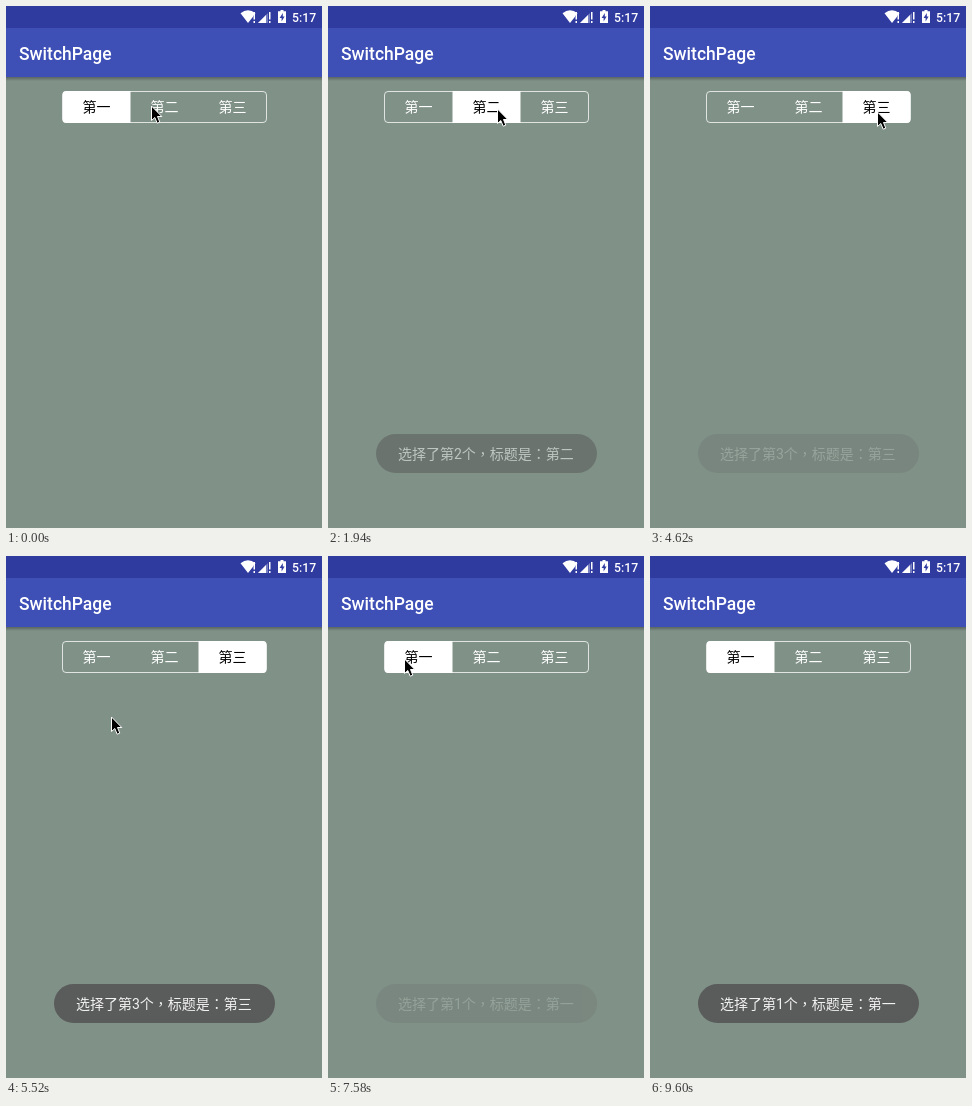
Write an HTML page that moves like this. It is 316 px wide and 522 px high and loops after 9700 ms.

```html
<!DOCTYPE html>
<html lang="zh-TW">
<head>
<meta charset="utf-8">
<title>SwitchPage</title>
<style>
  html, body { margin: 0; width: 100%; height: 100%; overflow: hidden; background: #809188; }
  svg { display: block; width: 316px; height: 522px; }
  text { font-family: Roboto, "Noto Sans CJK TC", "Noto Sans CJK JP", sans-serif; font-size: 14px; fill: #fff; }
  .medium { font-weight: 500; }
  .label { text-anchor: middle; }
</style>
</head>
<body>
<svg viewBox="0 0 316 522">
  <defs>
    <linearGradient id="shade" x2="0" y2="1">
      <stop stop-color="#000" stop-opacity=".3"/>
      <stop offset="1" stop-color="#000" stop-opacity="0"/>
    </linearGradient>
    <clipPath id="frame"><rect x="56.5" y="85" width="204" height="32" rx="4"/></clipPath>
    <path id="alert" d="M0 6h1.500v7.500h-1.500zM0 15h1.500v2h-1.500z"/>
  </defs>
  <rect width="316" height="522" fill="#809188"/>
  <rect y="71" width="316" height="4" fill="url(#shade)"/>
  <rect width="316" height="71" fill="#3e4fb6"/>
  <rect width="316" height="22" fill="#303ba0"/>

  <g fill="#fff">
    <path d="M234.500 7.200Q242 1.500 249.500 7.200L247 10.300V10.700L242 17Z"/>
    <use href="#alert" x="247.500"/>
    <path d="M252 17L262 7V17Z" opacity=".35"/>
    <path d="M252 17L260 9V17Z"/>
    <use href="#alert" x="263"/>
    <path d="M274.500 4h3v1.300h2.500V17h-8V5.300h2.500z"/>
  </g>
  <path d="M276.800 7L273.600 11.900H275.600V15.400L278.600 10.500H276.800Z" fill="#303ba0"/>
  <text class="medium" x="286" y="15.500" style="font-size:12.25px">5:17</text>
  <text class="medium" x="13" y="53.500" style="font-size:17.5px">SwitchPage</text>

  <rect id="selection" y="85" width="68" height="32" fill="#fff" clip-path="url(#frame)"/>
  <rect x="56.500" y="85.500" width="204" height="31" rx="3.500" fill="none" stroke="#fff" stroke-opacity=".75"/>
  <g id="labels"></g>

  <g id="toast">
    <rect x="48" y="428" width="221" height="39" rx="19.500" fill="#5a5c5b"/>
    <text id="message" x="70" y="453" style="fill:#f2f2f2"></text>
  </g>

  <path id="cursor" d="M.5 1V15.500L3.800 12.500L6.200 18.200L8.800 17.100L6.500 11.500H10.800Z"
        fill="#000" stroke="#fff" stroke-linejoin="round"/>
</svg>
<script>
const LOOP = 9700, FIRST_STEP = 1346, STEP = 148.4, LAST_STEP = 53;
const TOAST_DELAY = 65, TOAST_LIFE = 1930, FADE = 500, GLIDE = 450;
const names = ["第一", "第二", "第三"];
const byId = id => document.getElementById(id);

const labels = names.map((name, i) => {
  const label = document.createElementNS("http://www.w3.org/2000/svg", "text");
  label.setAttribute("class", "label");
  label.setAttribute("x", 90.5 + 68 * i);
  label.setAttribute("y", 106);
  label.textContent = name;
  byId("labels").append(label);
  return label;
});

// Each tap selects a tab, then its toast fades in and later out.
const taps = [{ tab: 1, at: 1710 }, { tab: 2, at: 4495 }, { tab: 0, at: 7470 }];

const home = { x: 145, y: 99 };
const glides = [
  { at: 1300, x: 169, y: 102 },
  { at: 1960, x: 216, y: 109 },
  { at: 2850, x: 231, y: 109 },
  { at: 3750, x: 227, y: 105 },
  { at: 4640, x: 112, y: 179 },
  { at: 5370, x: 77, y: 88 },
  { at: 5960, x: 77, y: 105 },
  { at: 6950, x: 76, y: 102 },
  { at: 8250, x: 216, y: 497 },
  { at: 8750, x: 290, y: 530 },
];

const clamp = v => Math.min(1, Math.max(0, v));
const smooth = v => v * v * (3 - 2 * v);

function pointerAt(t) {
  return glides.reduce((from, to) => {
    const k = smooth(clamp((t - to.at) / GLIDE));
    return { x: from.x + (to.x - from.x) * k, y: from.y + (to.y - from.y) * k };
  }, home);
}

function toastOpacity(age) {
  const fadeIn = 1 - (1 - clamp(age / FADE)) ** 2;
  const fadeOut = 1 - clamp((age - TOAST_LIFE) / FADE) ** 2;
  return fadeIn * fadeOut;
}

function draw(time) {
  // The screen refreshes in coarse, even steps and rests after the last one.
  const step = Math.min(LAST_STEP, Math.floor((time - FIRST_STEP) / STEP));
  const t = step < 0 ? 0 : FIRST_STEP + step * STEP;

  const tap = taps.findLast(({ at }) => t >= at);
  const tab = tap ? tap.tab : 0;
  byId("selection").setAttribute("x", 56.5 + 68 * tab);
  labels.forEach((label, i) => label.style.fill = i === tab ? "#000" : "#fff");

  byId("toast").setAttribute("opacity", tap ? toastOpacity(t - tap.at - TOAST_DELAY) : 0);
  byId("message").textContent = `选择了第${tab + 1}个，标题是：${names[tab]}`;

  const { x, y } = pointerAt(t);
  byId("cursor").setAttribute("transform", `translate(${Math.round(x)} ${Math.round(y)})`);
}

const start = performance.now();
function tick() {
  draw((performance.now() - start) % LOOP);
  requestAnimationFrame(tick);
}
tick();
</script>
</body>
</html>
```
